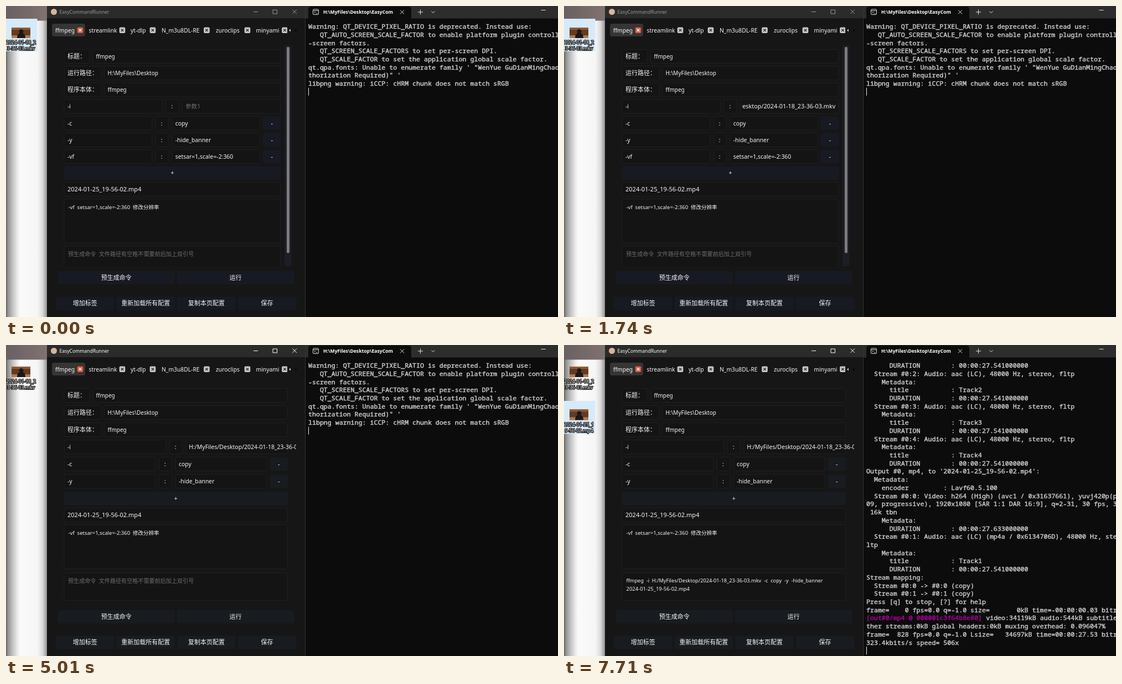
Animation of 997 by 562 pixels, one loop 8000 ms. Source, as an HTML page:

```html
<!DOCTYPE html>
<html lang="zh-CN">
<head>
<meta charset="utf-8">
<title>EasyCommandRunner</title>
<style>
html, body { margin: 0; height: 100%; overflow: hidden; background: #161616; }
svg { display: block; width: 100vw; height: 100vh; }
svg svg { width: auto; height: auto; }
text { font-family: 'Noto Sans', 'Noto Sans CJK SC', 'Noto Sans CJK', sans-serif; white-space: pre; }
.mono { font: 500 11.62px 'Noto Sans Mono', 'Noto Sans CJK SC', 'Noto Sans CJK', monospace; stroke-width: .4; }
.field { fill: #141414; stroke: #202020; }
.hover { fill: #282828; stroke: #4a4a4a; }
.label { fill: #fff; stroke: #161616; stroke-width: 2.2; paint-order: stroke; }
</style>
</head>
<body>
<svg id="stage" viewBox="0 0 997 562" preserveAspectRatio="none">
  <defs>
    <linearGradient id="wall">
      <stop offset="0" stop-color="#686868"/>
      <stop offset=".06" stop-color="#989898"/>
      <stop offset=".17" stop-color="#c6c6c6"/>
      <stop offset=".28" stop-color="#ececec"/>
      <stop offset=".34" stop-color="#fafafa"/>
      <stop offset=".76" stop-color="#f6f6f6"/>
      <stop offset=".88" stop-color="#dcdada"/>
      <stop offset="1" stop-color="#8c8c8c"/>
    </linearGradient>
    <linearGradient id="roof">
      <stop offset="0" stop-color="#6a6062"/>
      <stop offset="1" stop-color="#80726f"/>
    </linearGradient>
    <clipPath id="pane"><rect x="84" y="58" width="440" height="413"/></clipPath>
  </defs>
</svg>
<script>
const LOOP = 8000;
const stage = document.getElementById('stage');
const FOCUS = 2840, REMOVE = 4920;

function add(parent, tag, attrs = {}, content) {
  const el = document.createElementNS('http://www.w3.org/2000/svg', tag);
  for (const k in attrs) el.setAttribute(k, attrs[k]);
  if (content !== undefined) el.textContent = content;
  parent.append(el);
  return el;
}
const group = (parent, attrs) => add(parent, 'g', attrs);
const rect = (p, x, y, width, height, attrs) => add(p, 'rect', { x, y, width, height, ...attrs });
const path = (p, d, stroke = '#ddd', width = 1) =>
  add(p, 'path', { d, stroke, 'stroke-width': width, fill: 'none' });
const text = (p, x, cy, s, size = 10.4, attrs = {}) =>
  add(p, 'text', { x, y: cy + size * .36, 'font-size': size, fill: '#f6f6f6', ...attrs }, s);

// Hard steps: table is [[time, value], ...] starting at 0
function steps(el, prop, table) {
  const frames = table.map(([t, v]) => ({ offset: t / LOOP, [prop]: v, easing: 'step-end' }));
  frames.push({ offset: 1, [prop]: table.at(-1)[1] });
  el.animate(frames, { duration: LOOP, iterations: Infinity });
  return el;
}
function during(el, ...spans) {
  const table = spans[0][0] > 0 ? [[0, 'hidden']] : [];
  for (const [from, to = LOOP] of spans) {
    table.push([from, 'visible']);
    if (to < LOOP) table.push([to, 'hidden']);
  }
  return steps(el, 'visibility', table);
}

// ---- desktop
const desk = group(stage);
rect(desk, 0, 0, 75, 562, { fill: 'url(#wall)' });
rect(desk, 0, 0, 75, 26.5, { fill: 'url(#roof)' });

function fileIcon(parent, dy, lines, attrs = {}) {
  const g = group(parent, { transform: `translate(0 ${dy})` });
  rect(g, 10, 39, 34, 19, { fill: '#633a24' });
  rect(g, 10, 39, 34, 4, { fill: '#8d5a35' });
  rect(g, 10, 53, 34, 5, { fill: '#b27a4c' });
  add(g, 'path', { d: 'M20 58 Q20 50 25 49 A4 4 0 1 1 30 49 Q35 50 35 58 Z', fill: '#1c1718' });
  lines.forEach((s, i) =>
    text(g, 27, 66 + 11.2 * i, s, 8.7, { 'text-anchor': 'middle', class: 'label', ...attrs }));
  return g;
}
const SOURCE = ['2024-01-18_2', '3-36-03.mkv'];
during(rect(desk, 0, 23, 56.5, 59, { fill: '#d6eafa' }), [0, FOCUS]);
fileIcon(desk, 0, SOURCE);
during(rect(desk, 0, 101, 56.5, 59.5, { fill: '#d6eafa' }), [7710]);
during(fileIcon(desk, 77.5, ['2024-01-25_1', '9-56-02.mp4']), [7480]);

// ---- runner window
const win = group(stage);
rect(win, 74, 0, 466, 562, { fill: '#161616' });
rect(win, 74, 0, 466, 22, { fill: '#2b2b2b' });
add(win, 'circle', { cx: 86.5, cy: 10.5, r: 5.5, fill: '#d9b49c' });
const GREYED = [[0, '#989898'], [FOCUS, '#ffffff']];
steps(text(win, 96.5, 10.5, 'EasyCommandRunner', 8.6), 'fill', GREYED);
steps(path(win, 'M447 10.5h8M482 7h7.5v7h-7.5zM517.5 6.5l7.5 7.5M525 6.5l-7.5 7.5'), 'stroke', GREYED);

rect(win, 83, 32, 60, 23, { rx: 4, fill: '#353535' });
[['ffmpeg', 89, 134], ['streamlink', 149.5, 210], ['yt-dlp', 225, 265], ['N_m3u8DL-RE', 281, 362.5],
 ['zuroclips', 379, 436], ['minyami', 451.5, 503.5]].forEach(([name, x, cx], i) => {
  text(win, x, 44, name, 10.3);
  rect(win, cx - 5.3, 38.5, 10.6, 10.6, { rx: 2, fill: i ? '#c9c9c9' : '#e8563f' });
  path(win, `M${cx - 2.3} 41.5l4.6 4.6m0 -4.6l-4.6 4.6`, i ? '#333' : '#fff', 1.4);
});
rect(win, 508, 34, 18, 20, { fill: '#161616' });
add(win, 'path', { d: 'M514 41.5v5l-3 -2.5z', fill: '#ccc' });
add(win, 'path', { d: 'M522.5 41.5v5l3 -2.5z', fill: '#050505' });

function button(parent, x, y, w, h, label, size = 11) {
  const face = rect(parent, x, y, w, h, { rx: 3 });
  steps(face, 'fill', [[0, '#181a23'], [REMOVE, '#181c20']]);
  const hover = rect(parent, x + .5, y + .5, w - 1, h - 1, { rx: 3, class: 'hover', visibility: 'hidden' });
  text(parent, x + w / 2, y + h / 2, label, size, { 'text-anchor': 'middle' });
  return hover;
}
during(button(win, 94, 479, 210.5, 24, '预生成命令'), [5590, 6190]);
during(button(win, 309, 479, 211, 24, '运行'), [6880, 7590]);
['增加标签', '重新加载所有配置', '复制本页配置', '保存'].forEach((s, i) =>
  button(win, 90 + 109.6 * i, 525.5, 105.5, 24, s));

const FILE = '2024-01-18_23-36-03.mkv', OUT = '2024-01-25_19-56-02.mp4';
const DIR = 'H:/MyFiles/Desktop/', NOTE = '-vf  setsar=1,scale=-2:360  修改分辨率';

function box(p, x, cy, w, s, size, attrs) {
  rect(p, x + .5, cy - 12.5, w - 1, 25, { rx: 3, class: 'field' });
  if (s) text(p, x + 6.5, cy, s, size, attrs);
}
// A nested svg clips text that is longer than its field
function clipped(p, x, cy, w) {
  const el = add(p, 'svg', { x, y: cy - 12 });
  el.style.cssText = `width:${w}px;height:24px;overflow:hidden`;
  return el;
}

function form(right, pitch, args) {
  const g = group(win, { 'clip-path': 'url(#pane)' });
  const left = 104.5, at = i => 91 + pitch * i;
  [['标题：', 47, 'ffmpeg'], ['运行路径：', 68, 'H:\\MyFiles\\Desktop'], ['程序本体：', 68, 'ffmpeg']]
    .forEach(([name, w, value], i) => {
      box(g, left, at(i), w, name, 11);
      box(g, left + w + 4.5, at(i), right - left - w - 4.5, value, 10);
    });
  const half = (right - left - 35) / 2;
  const pair = (i, key, value, w) => {
    box(g, left, at(i), w, key);
    box(g, left + w + 5.5, at(i), 24, '');
    text(g, left + w + 17, at(i), ':', 10.4, { 'text-anchor': 'middle' });
    box(g, left + w + 35, at(i), w, value, 10.4);
  };
  pair(3, '-i', '', half);
  let hover;
  args.forEach(([key, value], i) => {
    pair(4 + i, key, value, half - 18.8);
    hover = button(g, right - 32.5, at(4 + i) - 12, 32.5, 24, '-', 11);
  });
  const n = 4 + args.length, plus = at(n) - (n > 6 ? .9 : 0);
  button(g, left, plus - 12, right - left, 24, '+', 10.4);
  box(g, left, plus + 29.8, right - left, OUT, 11);
  const note = plus + 46.8;
  rect(g, left + .5, note + .5, right - left - 1, 80, { rx: 3, class: 'field' });
  text(g, 112.5, note + 15.2, NOTE, 9.5);
  const cmd = note + 85 + (n > 6 ? 0 : 2);
  rect(g, left + .5, cmd + .5, right - left - 1, 50, { rx: 3, class: 'field' });
  const hint = text(g, 112, cmd + 14.8, '预生成命令  文件路径有空格不需要前后加上双引号', 10.1, { fill: '#6e6e6e' });
  return { g, hover, hint, cmd, input: left + half + 35, inputY: at(3), inputW: half };
}

const ARGS = [['-c', 'copy'], ['-y', '-hide_banner'], ['-vf', 'setsar=1,scale=-2:360']];
const long = form(496.5, 30.2, ARGS);
during(long.g, [0, REMOVE]);
during(long.hover, [4030, REMOVE]);
rect(long.g, 503, 71, 12.5, 399, { rx: 3, fill: '#1c1e27' });
rect(long.g, 507, 74, 5, 372.5, { rx: 2, fill: '#7c7c7c' });

const inY = long.inputY;
during(text(long.g, 324, inY, '参数1', 10.6, { fill: '#6e6e6e' }), [0, 1740]);
during(rect(long.g, 340.5, 173.5, 63.5, 15, { fill: '#0078d7' }), [FOCUS, 2950]);
during(rect(long.g, 324, 173.5, 142.5, 15, { fill: '#0078d7' }), [2950, 3330]);
const tail = clipped(long.g, 321.5, inY, 170.5);
during(text(tail, 168.7, 12, DIR + FILE, 10.84, { 'text-anchor': 'end' }), [1740, 2950]);
const head = clipped(long.g, 321.5, inY, 170.5);
during(text(head, 2.3, 12, DIR + FILE, 10.5), [2950, REMOVE]);
during(rect(long.g, 390, 174, 1, 14, { fill: '#fff' }), [3330, 3830], [4320, REMOVE]);

const short = form(509, 31.05, ARGS.slice(0, 2));
during(short.g, [REMOVE]);
text(clipped(short.g, short.input + 3, short.inputY, short.inputW - 7.5), 3, 12, DIR + FILE, 10.5);
during(short.hint, [REMOVE, 5990]);
const command = group(short.g);
text(command, 112.5, short.cmd + 14.5, `ffmpeg  -i  ${DIR}${FILE}  -c  copy  -y  -hide_banner`, 9.2);
text(command, 112.5, short.cmd + 29, OUT, 9.45);
during(command, [5990]);

// ---- terminal
const term = group(stage);
const CELL = 6.975, ROW = 14.72, LEFT = 546;
rect(term, 540, 0, 457, 562, { fill: '#0c0c0c' });
rect(term, 540, 0, 457, 22.5, { fill: '#2d2d2d' });
rect(term, 540, 0, 1, 562, { fill: '#333' });
add(term, 'path', { d: 'M546 23V6q0 -5 5 -5H727q5 0 5 5V23z', fill: '#0c0c0c' });
rect(term, 554.5, 6, 10, 9.5, { rx: 1.5, fill: 'none', stroke: '#ddd' });
path(term, 'M554.5 8.5h10M557 10.5l1.6 1.3l-1.6 1.3M560 13.3h2.5');
text(term, 573, 11, 'H:\\MyFiles\\Desktop\\EasyCom', 8.6, { 'font-weight': 700, fill: '#fff' });
path(term, 'M712 7.5l7 7m0 -7l-7 7M744 11h9M748.5 6.5v9M768.5 9.5l3 3l3 -3M966.5 7.5h8', '#e4e4e4');

function print(parent, row, line) {
  const y = 41.1 + ROW * row;
  let col = 0;
  for (const run of line.match(/[^\x00-\x7f]+|\[out.*?\]|((?!\[out)[\x00-\x7f])+/g)) {
    const wide = run.charCodeAt(0) > 127;
    const ink = run.startsWith('[out') ? '#b4009e' : '#d2d2d2';
    const el = add(parent, 'text', { x: LEFT + col * CELL, y, class: 'mono', fill: ink, stroke: ink }, run);
    if (wide) el.style.cssText = `font-size:13px;letter-spacing:${2 * CELL - 13}px;stroke:none`;
    col += run.length * (wide ? 2 : 1);
  }
}
function screen(first, lines) {
  const g = group(term);
  lines.forEach((s, i) => print(g, first + i, s));
  return g;
}
const caret = row => rect(term, LEFT, 30 + ROW * row, 1, 14, { fill: '#eee' });

const LOG = 7480, RUN = 7260;
during(screen(0, [
  'Warning: QT_DEVICE_PIXEL_RATIO is deprecated. Instead use:',
  '   QT_AUTO_SCREEN_SCALE_FACTOR to enable platform plugin controll',
  '-screen factors.',
  '   QT_SCREEN_SCALE_FACTORS to set per-screen DPI.',
  '   QT_SCALE_FACTOR to set the application global scale factor.',
  'qt.qpa.fonts: Unable to enumerate family \' "WenYue GuDianMingChao',
  'thorization Required)" \'',
  'libpng warning: iCCP: cHRM chunk does not match sRGB'
]), [0, LOG]);
during(screen(8, [
  '运行路径： H:\\MyFiles\\Desktop',
  `命令： ffmpeg -i ${DIR}${FILE} -c copy`,
  `-hide_banner ${OUT}`,
  '描述： -vf setsar=1,scale=-2:360 修改分辨率'
]), [RUN, LOG]);

const META = '    Metadata:';
const length = s => `      DURATION        : 00:00:${s}000000`;
const title = n => `      title           : Track${n}`;
const audio = n => [`  Stream #0:${n}: Audio: aac (LC), 48000 Hz, stereo, fltp`, META, title(n), length('27.541')];
during(screen(0, [
  length('27.541'), ...audio(2), ...audio(3), ...audio(4),
  `Output #0, mp4, to '${OUT}':`,
  '  Metadata:',
  '    encoder         : Lavf60.5.100',
  '  Stream #0:0: Video: h264 (High) (avc1 / 0x31637661), yuvj420p(pc',
  '09, progressive), 1920x1080 [SAR 1:1 DAR 16:9], q=2-31, 30 fps, 30',
  ' 16k tbn',
  META, length('27.633'),
  '  Stream #0:1: Audio: aac (LC) (mp4a / 0x6134706D), 48000 Hz, stereo',
  'ltp',
  META, title(1), length('27.541'),
  'Stream mapping:',
  '  Stream #0:0 -> #0:0 (copy)',
  '  Stream #0:1 -> #0:1 (copy)',
  'Press [q] to stop, [?] for help',
  'frame=    0 fps=0.0 q=-1.0 size=       0kB time=-00:00:00.03 bitra',
  '[out#0/mp4 @ 000001c3f64b8e80] video:34119kB audio:544kB subtitle:',
  'ther streams:0kB global headers:0kB muxing overhead: 0.096047%',
  'frame=  828 fps=0.0 q=-1.0 Lsize=   34697kB time=00:00:27.53 bitra',
  '323.4kbits/s speed= 506x'
]), [LOG]);
during(caret(8), [0, RUN]);
during(caret(12), [RUN, LOG]);
during(caret(35), [LOG]);

// ---- dragged file
const ghost = group(stage);
const drag = [[540, 8, 6], [640, 60, 28], [740, 150, 60], [850, 240, 88], [950, 305, 104],
  [1050, 335, 109], [1270, 344, 111], [1360, 342, 113], [1560, 340, 114]];
steps(ghost, 'transform', [[0, 'translate(0px, 0px)'],
  ...drag.map(([t, x, y]) => [t, `translate(${x}px, ${y}px)`])]);
during(ghost, [540, 1740]);
fileIcon(group(ghost, { opacity: .75 }), 0, SOURCE, { class: '', fill: '#d0d0d0' });
const badge = group(ghost);
rect(badge, 38, 54, 39.5, 15.5, { rx: 2, fill: '#fff' });
path(badge, 'M42 62h8M46 58v8', '#222');
text(badge, 53, 61.8, '复制', 9.6, { fill: '#1c45b8' });
during(badge, [740, 1740]);
</script>
</body>
</html>
```
